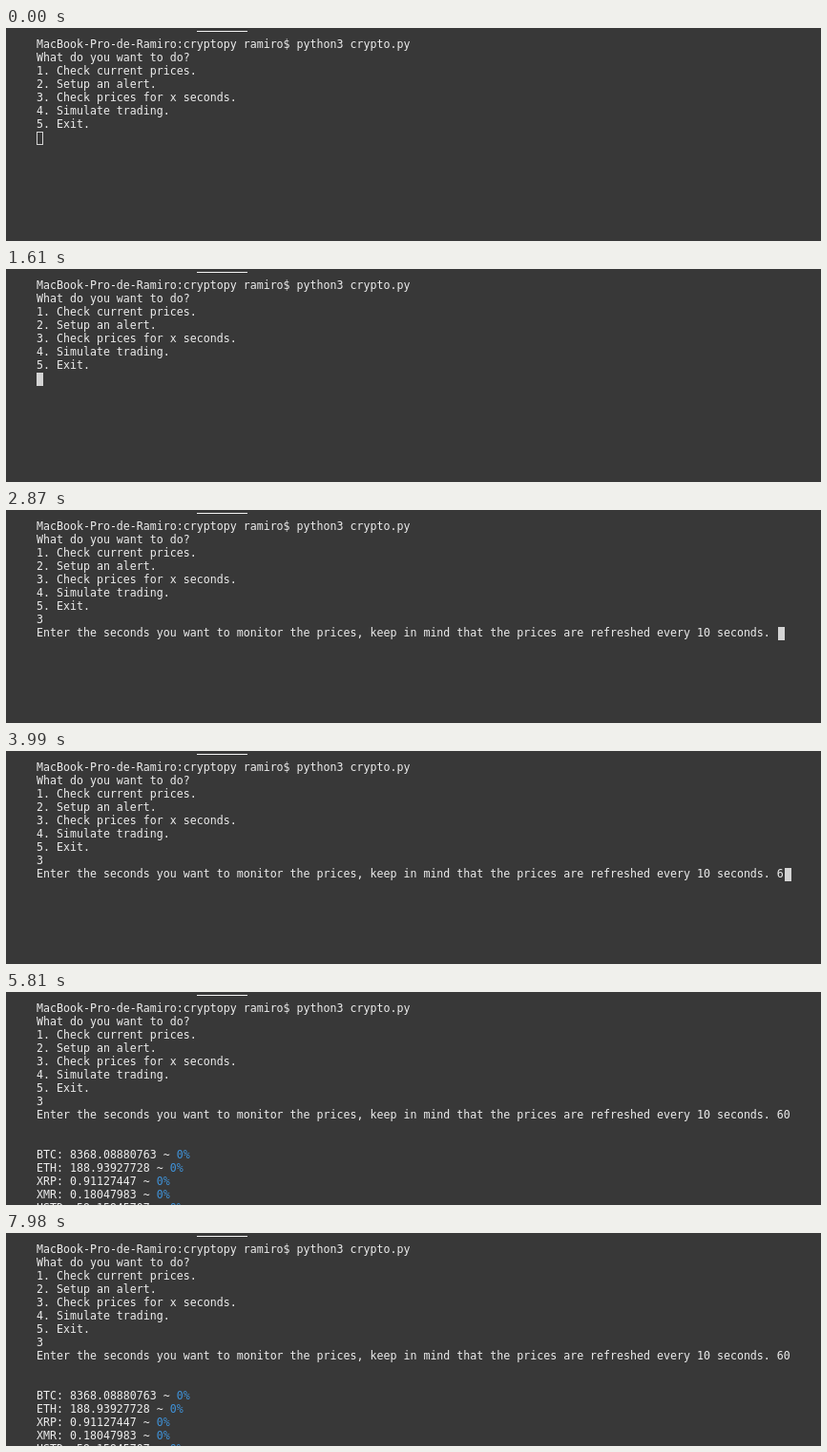
Recreate the animation shown at these times as an HTML page. Size 854x224 px, loop 8000 ms.

```html
<!DOCTYPE html>
<html lang="en">
<head>
<meta charset="utf-8">
<title>Terminal</title>
<style>
  html, body { margin: 0; width: 100%; height: 100%; overflow: hidden; background: #383838; }
  #stage { position: relative; width: 854px; height: 224px; overflow: hidden; }
  #tab { position: absolute; left: 200px; top: 3px; width: 53px; height: 1px; background: #f4f4f4; }
  #screen {
    position: absolute; left: 32px; top: 10px; margin: 0;
    font: 11.627px/14px "DejaVu Sans Mono", monospace;
    font-variant-ligatures: none; white-space: pre; color: #ececec;
  }
  #screen b { font-weight: normal; color: #3f92d8; }
  #cursor { position: absolute; box-sizing: border-box; width: 7px; height: 14px; border: 1px solid #d4d4d4; }
  #cursor.focused { background: #d4d4d4; }
</style>
</head>
<body>
<div id="stage">
  <div id="tab"></div>
  <pre id="screen"></pre>
  <div id="cursor"></div>
</div>
<script>
const LOOP = 8000, CELL = 7, LINE = 14, LEFT = 32, TOP = 11;
const screen = document.getElementById('screen');
const cursor = document.getElementById('cursor');

const menu = `MacBook-Pro-de-Ramiro:cryptopy ramiro$ python3 crypto.py
What do you want to do?
1. Check current prices.
2. Setup an alert.
3. Check prices for x seconds.
4. Simulate trading.
5. Exit.
`;
const question = '\nEnter the seconds you want to monitor the prices, keep in mind that the prices are refreshed every 10 seconds. ';
const prices = [
  ['BTC', '8368.08880763'],
  ['ETH', '188.93927728'],
  ['XRP', '0.91127447'],
  ['XMR', '0.18047983'],
  ['USTD', '59.15945707']
].map(([coin, price]) => `${coin}: ${price} ~ <b>0%</b>\n`).join('');

// Each step appends text at its start time.
const steps = [
  { at: 0, add: menu },
  { at: 630, add: '', focus: true },
  { at: 2450, add: '3' },
  { at: 2870, add: question },
  { at: 3990, add: '6' },
  { at: 4130, add: '0' },
  { at: 4340, add: '\n\n\n' },
  { at: 5110, add: prices }
];

let shown = -1;

function render(count) {
  const done = steps.slice(0, count);
  const text = done.map(step => step.add).join('');
  const lines = text.split('\n');
  screen.innerHTML = text;
  cursor.style.left = LEFT + lines.at(-1).length * CELL + 'px';
  cursor.style.top = TOP + (lines.length - 1) * LINE + 'px';
  cursor.classList.toggle('focused', done.some(step => step.focus));
}

function tick() {
  const time = performance.now() % LOOP;
  const count = steps.filter(step => step.at <= time).length;
  if (count !== shown) render(shown = count);
  requestAnimationFrame(tick);
}
tick();
</script>
</body>
</html>
```
